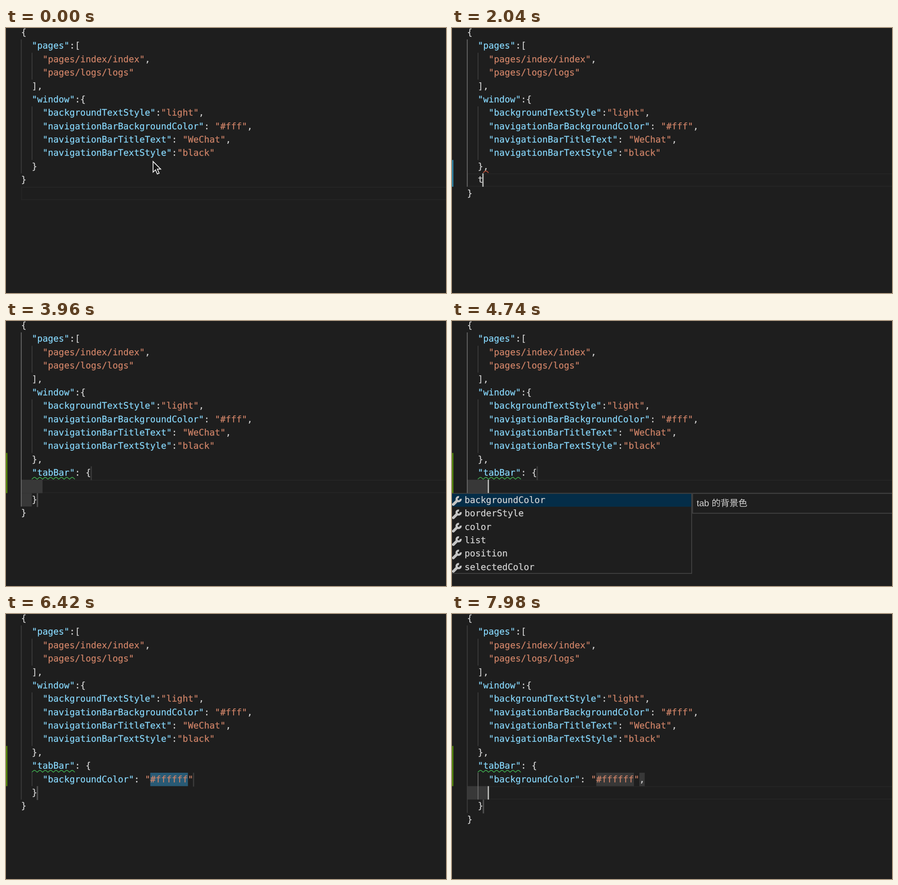
These frames come from a looping animation (963 by 581 pixels, 8000 ms). An HTML page:

```html
<!DOCTYPE html>
<html lang="zh-CN">
<head>
<meta charset="utf-8">
<title>JSON editing</title>
<style>
html, body { margin: 0; width: 100%; height: 100%; overflow: hidden; background: #1e1e1e; }
svg { display: block; width: 100vw; height: 100vh; }
text {
  font: 19.57px "DejaVu Sans Mono", monospace; white-space: pre; text-rendering: geometricPrecision;
  color: #d4d4d4; fill: currentColor; stroke: currentColor; stroke-width: .25px;
}
.key { color: #87d7fb; }
.str { color: #d08468; }
.doc { font-family: "Liberation Sans", "Noto Sans CJK SC", "Noto Sans CJK", sans-serif; stroke: none; }
</style>
</head>
<body>
<svg id="stage" viewBox="0 0 963 581"></svg>
<script>
const LOOP = 8000, X0 = 32.9, CW = 11.784, LH = 29.37, TOP = -4.4, BASE = 20.5;
const DIM = '#404040', LIT = '#747474', MARK = '#383838', BAR = '#505050';
const stage = document.getElementById('stage');

const head = `{
  "pages":[
    "pages/index/index",
    "pages/logs/logs"
  ],
  "window":{
    "backgroundTextStyle":"light",
    "navigationBarBackgroundColor": "#fff",
    "navigationBarTitleText": "WeChat",
    "navigationBarTextStyle":"black"`.split('\n');

// Each edit: time, caret row, caret column, lines after the head
const tab = '  "tabBar": {', color = '    "backgroundColor": "#ffffff"';
const edits = [
  [0, 12, 0, ['  }', '}']],
  [480, 10, 3, ['  }', '}']],
  [960, 10, 4, ['  },', '}']],
  [1320, 11, 2, ['  },', '', '}']],
  [2040, 11, 3, ['  },', '  t', '}']],
  [2160, 11, 4, ['  },', '  ta', '}']],
  [2640, 11, 13, ['  },', tab + '}', '}']],
  [3420, 12, 4, ['  },', tab, '', '  }', '}']],
  [4920, 12, 31, ['  },', tab, color, '  }', '}']],
  [7440, 12, 32, ['  },', tab, color, '  }', '}']],
  [7620, 12, 33, ['  },', tab, color + ',', '  }', '}']],
  [7800, 13, 4, ['  },', tab, color + ',', '', '  }', '}']]
];

const px = col => X0 + col * CW;
const py = row => TOP + row * LH;
const rect = (x, y, w, h, fill, more = '') =>
  `<rect x="${x}" y="${y}" width="${w}" height="${h}" fill="${fill}" ${more}/>`;
const label = (x, y, s, cls = '') => `<text x="${x}" y="${y}" class="${cls}">${s}</text>`;
const fillCols = (row, a, b, fill) => rect(px(a), py(row), (b - a) * CW, LH, fill);
const bar = (row, col, fill) => rect(px(col) - 1, py(row), 3, LH + 1, fill);
const guide = (col, a, b, fill) => rect(px(col) - .3, py(a), 1.6, (b - a + 1) * LH, fill);
const bracket = (row, col) =>
  rect(px(col), py(row) + 1, CW, LH - 2, 'rgba(0,100,0,.1)', 'stroke="#888" stroke-width="1.5"');

function codeLine(s, row) {
  let col = 0, out = '';
  for (const part of s.match(/"[^"]*"(?=:)|"[^"]*"|[^"]+/g) || []) {
    const next = s[col + part.length];
    const cls = part[0] !== '"' ? '' : next === ':' ? 'key' : 'str';
    const pad = part.length - part.trimStart().length;
    if (part.trim()) out += label(px(col + pad), py(row) + BASE, part.trimStart(), cls);
    col += part.length;
  }
  return out;
}

function squiggle(row, a, b, stroke) {
  const y = py(row + 1) - 1.2;
  let d = `M${px(a)} ${y}`;
  for (let c = a; c < b; c++) d += `l${CW * .4} -4 h${CW * .2} l${CW * .4} 4`;
  return `<path d="${d}" fill="none" stroke="${stroke}" stroke-width="1.6" stroke-linejoin="round"/>`;
}

function wrench(y) {
  return `<g transform="translate(0 ${y})" fill="none" stroke="#c5c5c5">
    <path d="M19 9.8A4.6 4.6 0 1 1 15.3 6.1" stroke-width="4.5"/>
    <path d="M11 14 3 22" stroke-width="6" stroke-linecap="round"/></g>`;
}

function popup(row, items, doc) {
  const y = py(row) + .6, border = 'stroke="#484848" stroke-width="1.6"';
  let out = rect(-4, y, 528.5, items.length * LH - .8, '#1e1e1e', border);
  out += rect(0, y + .8, 523.5, LH - 1, '#042d48');
  items.forEach((item, i) => {
    out += wrench(y + i * LH + 2) + label(27.5, y + i * LH + BASE + .4, item);
  });
  return out + rect(526.5, y, 450, 43.5, '#1e1e1e', border) + label(535.5, y + 28, doc, 'doc');
}

function pointer(t) {
  const p = Math.min(1, Math.max(0, (t - 60) / 360)), e = p * p * (3 - 2 * p);
  return `<path transform="translate(${321 - 231 * e} ${291 + 2 * e})"
    d="M.8 1.6V25l5.4-5 4 9 4-1.8-4-8.8h7.4Z" fill="#151515" stroke="#f4f4f4" stroke-width="1.7"/>`;
}

function draw(t) {
  const on = (a, b = LOOP) => t >= a && t < b;
  const [at, row, col, tail] = edits.filter(e => e[0] <= t).pop();
  const lines = [...head, ...tail], last = lines.length - 2;
  const selected = on(4920, 7440);
  let out = '';

  if (!selected)
    out += rect(34, py(row) + 1, 940, LH - 2, 'none', 'stroke="#262626" stroke-width="1.8"');

  // Snippet fields and selection
  if (on(2640, 3420)) out += bar(11, 14, BAR);
  if (on(3420, 4920))
    out += bar(11, 13, MARK) + fillCols(12, 0, 4, MARK) + fillCols(13, 0, 2, MARK);
  if (on(3420)) out += bar(last, 3, BAR);
  if (on(4920)) out += fillCols(12, 24, 31, selected ? '#285a75' : MARK);
  if (on(4920, 7620)) out += bar(12, 32, MARK);
  if (on(7620)) out += fillCols(12, 32, 33, MARK);
  if (on(7800)) out += fillCols(13, 0, 4, MARK);

  out += guide(0, 1, last, on(480, 4920) ? LIT : DIM);
  out += guide(2, 2, 3, DIM) + guide(2, 6, 9, DIM);
  if (on(4920)) out += guide(2, 12, last - 1, on(7800) ? LIT : DIM);

  if (on(540, 960)) out += bracket(5, 11) + bracket(10, 2);
  if (on(2760, 3420)) out += bracket(11, 12) + bracket(11, 13);

  out += lines.map(codeLine).join('');
  if (on(1860, 2820)) out += squiggle(10, 3, 4, '#c8553d');
  if (on(3000)) out += squiggle(11, 2, 10, '#3fa34d');

  if (on(1080)) {
    const rows = on(3660) ? 3 : on(1740) ? 2 : 1;
    out += rect(0, py(10), 3.2, rows * LH, on(3660) ? '#4f7f0a' : '#2d7d9d');
  }
  if (at && (t - at) % 1000 < 500) out += rect(px(col) - 2, py(row), 3, LH, '#b4b5b3');

  if (on(2220, 2640)) out += popup(12, ['tabBar'], '底部 tab 栏的表现');
  if (on(4080, 4920))
    out += popup(13, ['backgroundColor', 'borderStyle', 'color', 'list', 'position', 'selectedColor'],
      'tab 的背景色');
  if (t < 960) out += pointer(t);
  return out;
}

let start, shown;
function tick(now) {
  start ??= now;
  const view = draw((now - start) % LOOP);
  if (view !== shown) stage.innerHTML = shown = view;
  requestAnimationFrame(tick);
}
stage.innerHTML = shown = draw(0);
requestAnimationFrame(tick);
</script>
</body>
</html>
```
